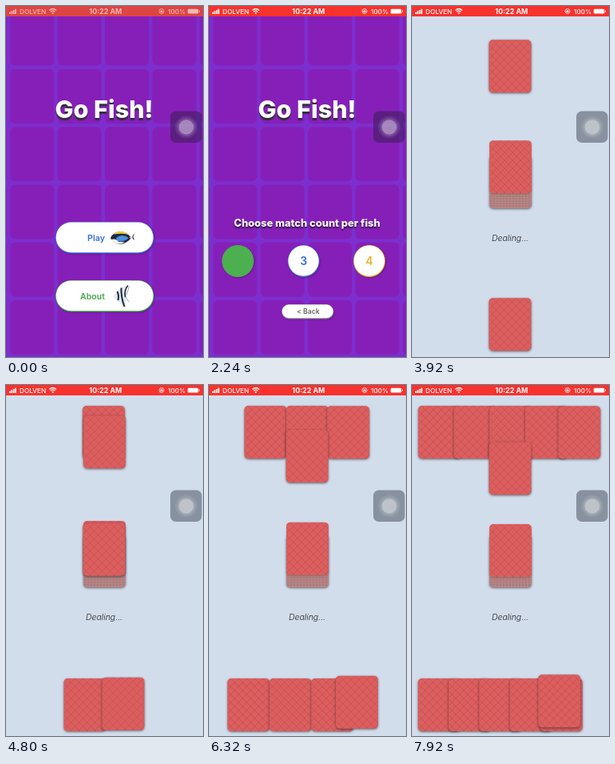
Animation, 247 px wide and 439 px high, one loop 8 s. Source, as an HTML page with a canvas:

```html
<!DOCTYPE html>
<html lang="en">
<head>
<meta charset="utf-8">
<title>Go Fish</title>
<style>
html, body { margin: 0; width: 100%; height: 100%; overflow: hidden; background: #861fb8; }
canvas { display: block; width: 247px; height: 439px; }
</style>
</head>
<body>
<canvas id="stage"></canvas>
<script>
const W = 247, H = 439, LOOP = 8000;
const CARD_W = 53, CARD_H = 66, MID_X = 96.5;
const CHOOSE = 880, PRESS = 2240, TABLE = 2400, SHUFFLED = 2880;
const DEAL = 3124, TICK = 416;
const BLUE = '#3a6fd8', GREEN = '#45a84b', YELLOW = '#ecb32c';

const canvas = document.getElementById('stage');
const dpr = window.devicePixelRatio || 1;
canvas.width = W * dpr;
canvas.height = H * dpr;
const c = canvas.getContext('2d');

const mix = (a, b, p) => a + (b - a) * p;

// Overdamped spring from 0 to 1.
function spring(ms) {
  if (ms <= 0) return 0;
  const a = .0061, b = .04;
  return 1 - (b * Math.exp(-a * ms) - a * Math.exp(-b * ms)) / (b - a);
}

function box(x, y, w, h, r, fill, stroke) {
  c.beginPath();
  c.roundRect(x, y, w, h, r);
  if (fill) { c.fillStyle = fill; c.fill(); }
  if (stroke) { c.strokeStyle = stroke; c.stroke(); }
}

function disc(x, y, r, fill) {
  box(x - r, y - r, 2 * r, 2 * r, r, fill);
}

function shadow(color, blur, y, x = 0) {
  c.shadowColor = color;
  c.shadowBlur = blur * dpr;
  c.shadowOffsetX = x * dpr;
  c.shadowOffsetY = y * dpr;
}

function noShadow() { shadow('transparent', 0, 0); }

function text(str, x, y, font, fill, align = 'center') {
  c.font = font + ' Inter, sans-serif';
  c.textAlign = align;
  c.textBaseline = 'alphabetic';
  c.fillStyle = fill;
  c.fillText(str, x, y);
}

function shape(fill, path) {
  c.fillStyle = fill;
  c.fill(new Path2D(path));
}

function line(color, width, path) {
  c.strokeStyle = color;
  c.lineWidth = width;
  c.stroke(new Path2D(path));
  c.lineWidth = 1;
}

function statusBar(shown) {
  c.fillStyle = '#f8322d';
  c.fillRect(0, 0, W, 13);
  c.fillStyle = `rgba(150,115,125,${.28 * (1 - shown)})`;
  c.fillRect(0, 0, W, 13);
  c.globalAlpha = mix(.62, 1, shown);
  c.fillStyle = '#fff';
  for (let i = 0; i < 4; i++) c.fillRect(4 + i * 2.4, 7.6 - i * 1.3, 1.7, 2.4 + i * 1.3);
  text('DOLVEN', 17, 9.8, '500 8.2px', '#fff', 'left');
  line('#fff', 1.3, 'M54.4 5.4Q58.7 1.6 63 5.4M56 7.3Q58.7 5 61.4 7.3');
  disc(58.7, 9, 1.1, '#fff');
  text('10:22 AM', 124.8, 9.8, '700 8.9px', '#fff');
  line('#fff', .8, 'M192 6.5a3 3 0 1 1 6 0a3 3 0 1 1 -6 0');
  box(193.6, 5.6, 2.8, 2.4, .5, '#fff');
  text('100%', 203, 9.8, '500 8.2px', '#fff', 'left');
  box(227.8, 3.8, 13.4, 5.6, 1.2, '#fff');
  c.fillRect(242, 5.6, 1, 2);
  c.globalAlpha = 1;
}

function touchDot(fill) {
  box(206, 131.5, 39.5, 39.5, 7, fill);
  disc(226, 151.5, 14, 'rgba(255,255,255,.08)');
  disc(226, 151.5, 11.5, 'rgba(255,255,255,.13)');
  disc(226, 151.5, 9.3, 'rgba(255,255,255,.33)');
}

// White button with a coloured rim that is thicker at its foot.
function button(x, y, w, h, rim, fill = '#fff') {
  shadow('rgba(0,0,0,.25)', 2, 1, 1);
  box(x, y, w, h, h / 2, rim);
  noShadow();
  box(x + .7, y + .6, w - 1.6, h - 1.8, h / 2, fill);
}

function tang() {
  shape('#1f2740', 'M131 290Q135 282 145 282Q153 284 157 290Q152 297 142 298Q134 297 131 290Z');
  shape('#4a90dc', 'M138 290Q145 284 154 290Q147 296 139 294Z');
  shape('#f0cf3c', 'M136 284Q146 279 154 286Q145 284 136 285.5Z');
  shape('#f2f2ea', 'M132 292Q138 290 141 295L149 295Q143 299 137 297Q134 296 132 292Z');
  line('#e9c83c', 1.4, 'M155 290L157.5 289');
  line('#1f2c48', 1.1, 'M160.5 285.5Q157.5 289 160.5 292');
}

function angel() {
  shape('#e3e9ea', 'M135 363Q139 354 152 349Q148 356 152 362Q148 367 151 377Q140 371 135 363Z');
  line('#1c2946', 2, 'M139.5 357Q142 362 140.5 368M144.5 352.5Q144 364 148.5 376');
  line('#1c2946', 1.6, 'M153 349.5Q148 355 149.5 364');
  line('#8c9bab', .9, 'M151 361L154.5 351M150 364L154 370');
}

function tiles() {
  c.fillStyle = '#7c2fce';
  c.fillRect(0, 0, W, H);
  for (let i = -1; i < 5; i++)
    for (let j = 0; j < 7; j++)
      box(5.3 + 59.4 * i, 6.6 + 72.3 * j, 55, 68, 6, '#861fb8');
}

function mainButtons() {
  button(62, 270, 123.5, 39.5, BLUE);
  text('Play', 113, 293.5, '600 10.8px', BLUE);
  tang();
  button(62, 343, 123.5, 39.5, GREEN);
  text('About', 108.5, 366.5, '600 10.6px', GREEN);
  angel();
}

function countButtons(pressed) {
  shadow('rgba(0,0,0,.7)', 1.5, 1.2);
  text('Choose match count per fish', 123, 276.3, '800 12.9px', '#fff');
  noShadow();
  [GREEN, BLUE, YELLOW].forEach((color, i) => {
    const x = 16.2 + 82.4 * i, down = pressed && i === 0;
    button(x, 299, 40, 40, down ? '#4caf50' : color, down ? '#4caf50' : '#fff');
    if (!down) text(i + 2, x + 20, 324, '600 14px', color);
  });
  button(91, 373, 65.5, 18.5, '#8d8a94');
  text('< Back', 124.3, 385.3, '600 8.7px', '#666');
}

function menu(t) {
  tiles();
  shadow('#303036', 1, 3);
  text('Go Fish!', 123, 140, '800 30.6px', '#fff');
  noShadow();
  if (t < CHOOSE) mainButtons();
  else countButtons(t >= PRESS);
  touchDot('rgba(50,30,75,.5)');
}

function card(x, y, h = CARD_H, depth = .6) {
  shadow(`rgba(20,25,30,${depth})`, 3, 1);
  box(x, y, CARD_W, h, 5, '#db5f5f');
  noShadow();
  c.save();
  c.clip();
  c.beginPath();
  for (let d = -h; d < CARD_W + h; d += 10) {
    c.moveTo(x + d, y);
    c.lineTo(x + d + h, y + h);
    c.moveTo(x + d, y);
    c.lineTo(x + d - h, y + h);
  }
  c.strokeStyle = 'rgba(165,45,55,.36)';
  c.lineWidth = .8;
  c.stroke();
  c.restore();
  c.lineWidth = 1;
}

const deckTop = dealt => 167 + .58 * dealt;

function deck(dealt) {
  shadow('rgba(20,25,30,.6)', 3, 1);
  box(97, 187, CARD_W, CARD_H, 5, '#c98484');
  noShadow();
  c.save();
  c.clip();
  c.beginPath();
  for (let x = 99; x < 150; x += 4) { c.moveTo(x, 187); c.lineTo(x, 253); }
  for (let y = 190; y < 253; y += 3) { c.moveTo(97, y); c.lineTo(150, y); }
  c.strokeStyle = 'rgba(115,120,120,.5)';
  c.stroke();
  c.restore();
  card(97, deckTop(dealt), CARD_H, .2);
}

function shuffle(t) {
  const k = Math.sin(Math.PI * (t - TABLE) / (SHUFFLED - TABLE)) / .866;
  const pile = (dx, top, bottom) =>
    card(97 + dx * k, 167 + top * k, 86 + (bottom - top) * k);
  pile(-2, 17, 17);
  pile(9, -2, 2);
  pile(-5, -9, 10);
}

function slotX(i, n) {
  const gap = n > 1 ? Math.min(52.5, 178 / (n - 1)) : 0;
  return MID_X + (i - (n - 1) / 2) * gap;
}

// Even deals go to the bottom hand, odd ones to the top; a hand spreads one tick after its deal.
function hand(t, side, endY) {
  const count = Math.ceil((Math.floor((t - DEAL) / TICK) + 1 - side) / 2);
  for (let i = 0; i < count; i++) {
    const order = 2 * i + side;
    let x = MID_X;
    for (let n = i + 1; n <= count; n++) {
      const spread = DEAL + TICK * (2 * (n - 1) + side + 1);
      x = mix(x, slotX(i, n), spring(t - spread));
    }
    card(x, mix(deckTop(order), endY, spring(t - DEAL - TICK * order)));
  }
}

function table(t) {
  c.fillStyle = '#d2ddec';
  c.fillRect(0, 0, W, H);
  if (t < SHUFFLED) shuffle(t);
  else {
    deck(Math.max(0, Math.floor((t - DEAL) / TICK) + 1));
    if (t >= DEAL) {
      text('Dealing...', 123, 293.5, 'italic 300 10.5px', '#222');
      hand(t, 0, 367);
      hand(t, 1, 26);
    }
  }
  touchDot('rgba(75,85,98,.55)');
}

const start = performance.now();

function draw() {
  const t = (performance.now() - start) % LOOP;
  c.setTransform(dpr, 0, 0, dpr, 0, 0);
  if (t < TABLE) menu(t);
  else table(t);
  statusBar(Math.min(1, t / 400));
  requestAnimationFrame(draw);
}

draw();
</script>
</body>
</html>
```
